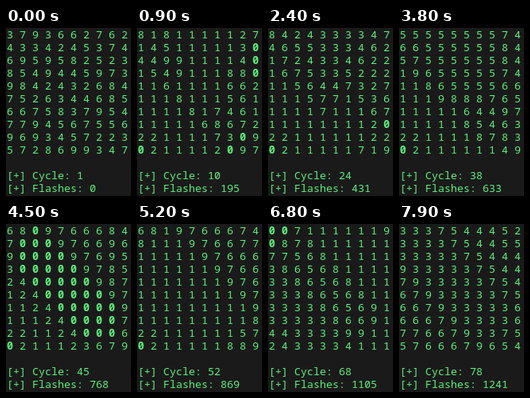
Animation of 157x210 px, one loop 8 s. Source, as an HTML page:

```html
<!DOCTYPE html>
<html lang="en">
<head>
<meta charset="utf-8">
<title>Flash cycles</title>
<style>
  html, body { margin: 0; width: 100%; height: 100%; overflow: hidden; background: #1a1a1a; }
  pre {
    position: absolute; left: 1px; top: 0; margin: 0;
    font: 500 10pt/16px "Noto Sans Mono", "DejaVu Sans Mono", monospace;
    color: #5cf07c;
  }
  b { font-weight: 700; }
</style>
</head>
<body>
<pre id="screen"></pre>
<script>
const LOOP = 8000, TICK = 100, SIZE = 10;
const start = `2682551651 3223134263 5848471412 7438334862 8731321573
  6415233574 5564726843 6683456445 8582346112 4617588236`;

const grid = start.split(/\s+/).map(row => [...row].map(Number));
let flashes = 0;

// Raise one cell; a cell passing 9 flashes once and raises its neighbours.
function raise(y, x) {
  if (y < 0 || x < 0 || y >= SIZE || x >= SIZE) return;
  if (++grid[y][x] !== 10) return;
  flashes++;
  for (let dy = -1; dy <= 1; dy++)
    for (let dx = -1; dx <= 1; dx++)
      if (dy || dx) raise(y + dy, x + dx);
}

function step() {
  for (let y = 0; y < SIZE; y++)
    for (let x = 0; x < SIZE; x++) raise(y, x);
  for (const row of grid)
    row.forEach((v, x) => { if (v > 9) row[x] = 0; });
}

function render(cycle) {
  const rows = grid.map(row => row.map(v => v || "<b>0</b>").join(" "));
  return `${rows.join("\n")}\n\n[+] Cycle: ${cycle}\n[+] Flashes: ${flashes}`;
}

const screens = [];
for (let cycle = 1; cycle <= LOOP / TICK; cycle++) {
  step();
  screens.push(render(cycle));
}

// The program runs slightly slower than the clock: one cycle lost every 57 ticks.
function screenAt(ms) {
  const tick = Math.floor((ms % LOOP) / TICK);
  return screens[tick - Math.floor((tick + 40) / 57)];
}

const pre = document.getElementById("screen");
const t0 = performance.now();
let shown;
function draw() {
  const next = screenAt(performance.now() - t0);
  if (next !== shown) pre.innerHTML = shown = next;
  requestAnimationFrame(draw);
}
draw();
</script>
</body>
</html>
```
